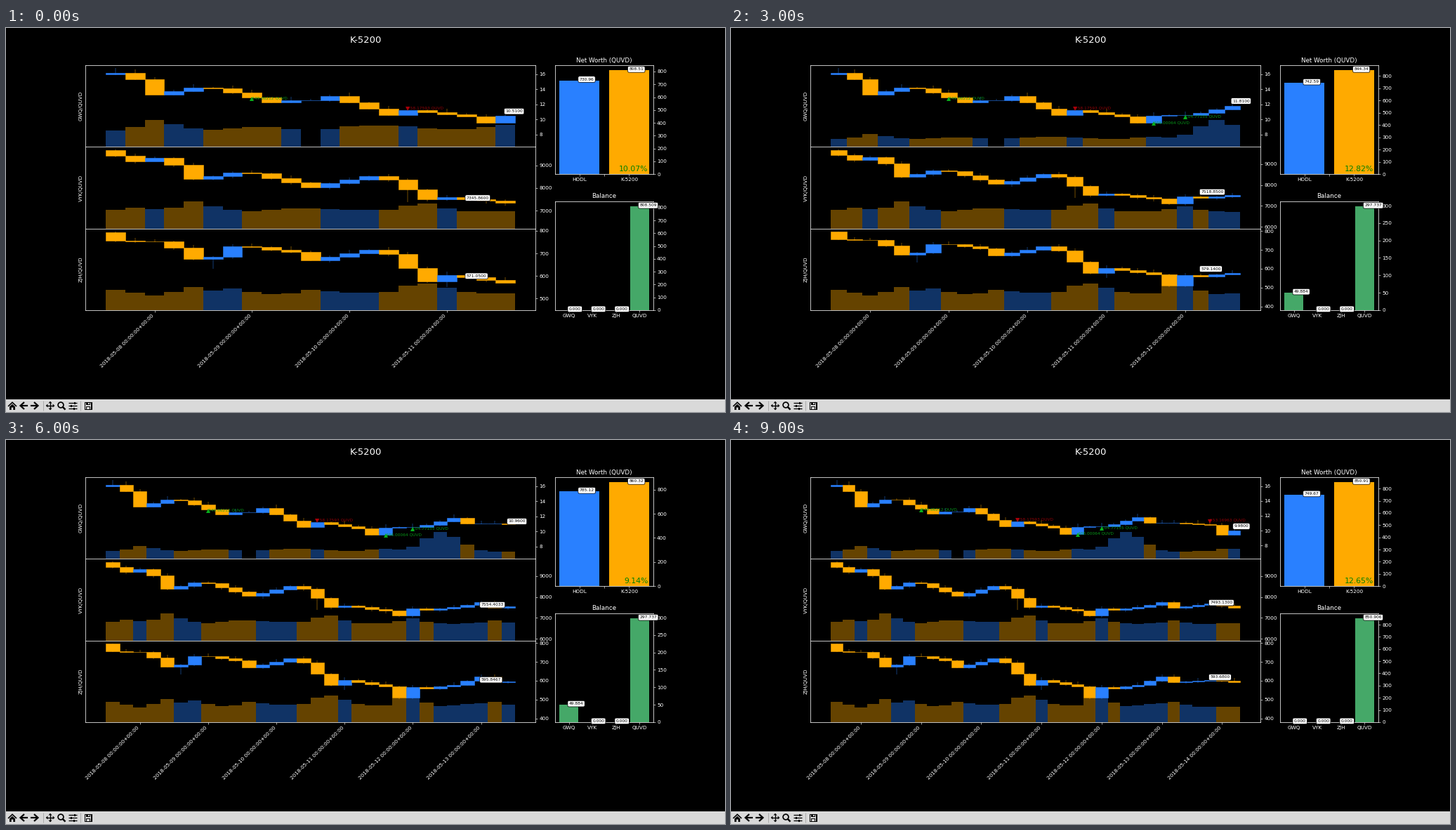
A matplotlib script for the animation above (10 s loop, 1024x547 px).

```python
import math

import numpy as np
import matplotlib.pyplot as plt
from matplotlib.animation import FuncAnimation
from matplotlib.patches import Circle, Polygon, Rectangle

W, H, DPI = 1024, 547, 64
PX = 72 / DPI            # one pixel in points
EM = 7.28 * PX           # base font size in points
FIRST, LAST = 21, 34     # candles on screen at the start and end of the loop
FRAMES = 10
UP, DOWN, GREEN = "#2980ff", "#ffaa00", "#45a868"
BUY, SELL = "#08b01c", "#a80008"
VOLUME_SHARE = 0.33
COIN, CASH, BOT = "GWQ", "QUVD", "K-5200"

plt.rcParams.update({
    "font.family": "DejaVu Sans", "font.size": EM,
    "figure.facecolor": "black", "axes.facecolor": "black",
    "text.color": "white", "axes.edgecolor": "white", "axes.labelcolor": "white",
    "xtick.color": "white", "ytick.color": "white",
    "axes.linewidth": 0.75 * PX, "axes.titlepad": 4.4 * PX,
    "axes.labelpad": 2.9 * PX,
    "xtick.major.size": 2.5 * PX, "ytick.major.size": 2.5 * PX,
    "xtick.major.pad": 2.5 * PX, "ytick.major.pad": 2.5 * PX,
    "xtick.major.width": 0.6 * PX, "ytick.major.width": 0.6 * PX,
})


class Market:
    """Candles chained along a price path that is linear between turning points.

    Wicks follow a wave; `spikes` are (index, price) extremes that stick out.
    Volume grows with the size of the current and previous price move.
    """

    def __init__(self, symbol, path, reach, spikes, label_back, surge=0):
        self.symbol, self.label_back = symbol, label_back
        prices = np.interp(np.arange(-1, LAST), list(path), list(path.values()))
        self.open, self.close = prices[:-1], prices[1:]

        i = np.arange(LAST)
        up, down = reach
        self.high = np.maximum(self.open, self.close) + up * (0.6 - 0.4 * np.cos(2.4 * i))
        self.low = np.minimum(self.open, self.close) - down * (0.6 + 0.4 * np.sin(2.4 * i))
        for k, price in spikes:
            self.high[k] = max(self.high[k], price)
            self.low[k] = min(self.low[k], price)

        move = np.abs(self.close - self.open)
        activity = (move + 0.5 * np.r_[0, move[:-1]]) / move.max()
        rally = surge * np.exp(-((i - 24) / 1.7) ** 2)
        self.volume = (1 + 0.6 * activity + rally) * (move > 0)


MARKETS = [
    Market(COIN, {-1: 16, 0: 16.15, 1: 15.35, 2: 13.27, 4: 14.18, 5: 14.13, 8: 12.3,
                  9: 12.52, 10: 12.52, 11: 13.05, 14: 10.6, 15: 11.2, 18: 10.4, 19: 9.55,
                  20: 10.51, 22: 10.57, 23: 10.82, 25: 11.81, 26: 11.05, 28: 11.07,
                  31: 10.74, 32: 9.43, 33: 9.98},
           (0.5, 0.13), [(0, 16.82)], 1, surge=2.5),
    Market("VYK", {-1: 9670, 1: 9180, 2: 9330, 3: 9020, 4: 8390, 6: 8680, 7: 8650, 10: 8040,
                   13: 8530, 14: 8380, 16: 7510, 17: 7600, 20: 7345.86, 21: 7115,
                   22: 7457.36, 23: 7385.67, 25: 7518.85, 27: 7740, 28: 7487.58,
                   31: 7688.05, 33: 7493.13},
           (100, 110), [(15, 7390), (20, 7234)], 3),
    Market("ZJH", {-1: 795, 0: 755, 2: 752, 3: 724, 4: 674, 5: 684, 6: 731, 7: 728, 9: 706,
                   10: 669, 13: 717, 14: 696, 16: 577, 17: 605, 20: 571.05, 21: 510,
                   22: 565.57, 23: 558.11, 25: 579.14, 27: 622, 28: 591.22, 31: 605.1,
                   33: 593.68},
           (15, 8), [(5, 633), (17, 551)], 3),
]

# candle index, price, amount, side
TRADES = [(7, 12.72, "349.66212", "buy"), (15, 11.38, "758.17593", "sell"),
          (20, 9.45, "406.00064", "buy"), (22, 10.28, "104.77155", "buy"),
          (31, 11.27, "553.16963", "sell")]
HODL = [730.96, 716.09, 717.74, 742.59, 771.40, 777.68, 785.12, 773.68, 763.25, 749.67]
WORTH = [808.51, 812.62, 815.27, 844.34, 870.15, 858.68, 860.32, 861.50, 850.91, 850.91]
# candles shown from which the holdings apply, coins, cash
HOLDINGS = [(0, 0, 808.509), (23, 39.792, 402.508), (24, 49.884, 297.737), (33, 0, 850.906)]


def pixel_axes(left, top, right, bottom):
    return fig.add_axes([left / W, 1 - bottom / H, (right - left) / W, (bottom - top) / H])


def tag(ax, x, y, text):
    ax.text(x, y, text, color="black", fontsize=EM * 0.833, va="baseline",
            bbox=dict(boxstyle="round", fc="white", ec="black", lw=0.7 * PX))


def draw_trades(ax, count):
    for i, price, amount, side in TRADES:
        if i > count - 2:
            continue
        color, marker = (BUY, "^") if side == "buy" else (SELL, "v")
        ax.plot(i, price, marker, color=color, ms=6.5 * PX, mew=0, zorder=3)
        ax.text(i, price, f"{amount} {CASH}", color=color, fontsize=EM * 0.8, alpha=0.85)


def draw_market(ax, market, count):
    idx = np.arange(count)
    o, c, h, l, v = (a[:count] for a in
                     (market.open, market.close, market.high, market.low, market.volume))
    colors = np.where(c >= o, UP, DOWN)
    ax.bar(idx, v / v.max() * VOLUME_SHARE, 1, color=colors, alpha=0.4, lw=0,
           transform=ax.get_xaxis_transform(), zorder=1)
    ax.vlines(idx, l, h, colors=colors, lw=0.45 * PX, zorder=2)
    ax.bar(idx, c - o, 1, bottom=o, color=colors, edgecolor=colors, lw=0.55 * PX, zorder=2)

    pad = 0.05 * (h.max() - l.min())
    low, high = l.min() - pad, h.max() + pad
    ax.set_ylim(low - VOLUME_SHARE * (high - low), high)
    ax.set_xlim(-0.5 - 0.05 * count, count - 0.5 + 0.05 * count)
    ax.set_xticks([])
    ax.yaxis.tick_right()
    ax.set_ylabel(f"{market.symbol}/{CASH}")
    tag(ax, count - market.label_back, h[-1], f"{c[-1]:.4f}")


def draw_days(ax, count):
    days = range(math.floor((1.05 * count - 2.5) / 5) + 1)
    ax.set_xticks([2 + 5 * d for d in days],
                  [f"2018-05-{8 + d:02d} 00:00:00+00:00" for d in days],
                  rotation=45, ha="right")


def draw_bars(ax, title, names, values, colors, digits):
    xs = np.arange(len(values))
    ax.bar(xs, values, 0.8, color=colors)
    ax.set_xticks(xs, names)
    ax.set_ylim(0, 1.05 * max(values))
    ax.yaxis.tick_right()
    ax.set_title(title, fontsize=EM * 1.2)
    for x, value in zip(xs, values):
        tag(ax, x, value, f"{value:.{digits}f}")
    span = 1.1 * (len(values) - 0.2)
    middle = (len(values) - 1) / 2
    ax.set_xlim(middle - span / 2, middle + span / 2)


def draw_toolbar():
    bar = pixel_axes(0, 528.5, W, H)
    bar.set(xlim=(0, W), ylim=(H, 528.5))
    bar.axis("off")
    gray = "#d9d9d9"

    def stroke(points, width, color="black"):
        xs, ys = zip(*points)
        bar.plot(xs, ys, color=color, lw=width * PX, solid_capstyle="butt",
                 solid_joinstyle="miter")

    def fill(points):
        bar.add_patch(Polygon(points, color="black", lw=0))

    def box(x, y, w, h, color="black"):
        bar.add_patch(Rectangle((x, y), w, h, color=color, lw=0))

    box(0, 528, W, 19, gray)
    for x in (53, 105.5):
        stroke([(x, 531), (x, 545)], 0.8, "#a0a0a0")
    # home
    stroke([(3, 539), (9, 533.3), (15, 539)], 1.6)
    fill([(5, 539.5), (9, 535.7), (13, 539.5), (13, 544), (10.3, 544),
          (10.3, 540.5), (7.7, 540.5), (7.7, 544), (5, 544)])
    # back and forward
    for x, s in ((25, 1), (41, -1)):
        stroke([(x + s, 533), (x - 4.5 * s, 538), (x + s, 543)], 2.2)
        stroke([(x - 4 * s, 538), (x + 6 * s, 538)], 2.2)
    # pan
    stroke([(58, 538), (68, 538)], 1.4)
    stroke([(63, 533), (63, 543)], 1.4)
    for dx, dy in ((1, 0), (-1, 0), (0, 1), (0, -1)):
        bx, by = 63 + 3.6 * dx, 538 + 3.6 * dy
        fill([(63 + 6.3 * dx, 538 + 6.3 * dy), (bx + 2.5 * dy, by + 2.5 * dx),
              (bx - 2.5 * dy, by - 2.5 * dx)])
    # zoom
    bar.add_patch(Circle((78, 537), 3.9, fill=False, ec="black", lw=1.7 * PX))
    stroke([(80.6, 539.6), (84.5, 543.6)], 2.4)
    # sliders
    for y, knob in ((534, 97), (538, 92), (542, 96)):
        stroke([(89, y), (101, y)], 1.3)
        box(knob, y - 1.5, 2.2, 3)
    # save
    box(111.5, 532.7, 11, 11)
    box(112.6, 533.8, 8.8, 8.8, gray)
    box(114, 533, 5.6, 4)
    box(117.2, 533.8, 1.4, 2.2, gray)
    box(113.8, 538.6, 6.4, 5)
    box(114.8, 539.6, 4.4, 3, gray)


def draw(frame):
    fig.clear()
    count = math.ceil(FIRST + (LAST - FIRST) * frame / (FRAMES - 1))
    fig.text(512 / W, 1 - 21 / H, BOT, fontsize=EM * 1.8, ha="center", va="baseline")

    edges = np.linspace(53, 401.9, len(MARKETS) + 1)
    panes = [pixel_axes(113, top, 754.3, bottom) for top, bottom in zip(edges, edges[1:])]
    for ax, market in zip(panes, MARKETS):
        draw_market(ax, market, count)
    draw_trades(panes[0], count)
    draw_days(panes[-1], count)

    hodl, worth = HODL[frame], WORTH[frame]
    net = pixel_axes(782, 53, 922, 208.2)
    draw_bars(net, f"Net Worth ({CASH})", ["HODL", BOT], [hodl, worth], [UP, DOWN], 2)
    net.set_xticks([0, 0.5, 1], ["HODL", "", BOT])
    gain = 200 * (worth - hodl) / (worth + hodl)
    net.text(0.948, 0.024, f"{gain:.2f}%", transform=net.transAxes, color="green",
             fontsize=EM * 1.5, ha="right", va="baseline")

    coins, cash = [h[1:] for h in HOLDINGS if h[0] <= count][-1]
    draw_bars(pixel_axes(782, 246.8, 922, 401.9), "Balance",
              [m.symbol for m in MARKETS] + [CASH], [coins, 0, 0, cash], GREEN, 3)
    draw_toolbar()


fig = plt.figure(figsize=(W / DPI, H / DPI), dpi=DPI)
anim = FuncAnimation(fig, draw, frames=FRAMES, interval=1000, repeat=True, repeat_delay=0)
plt.show()
```
